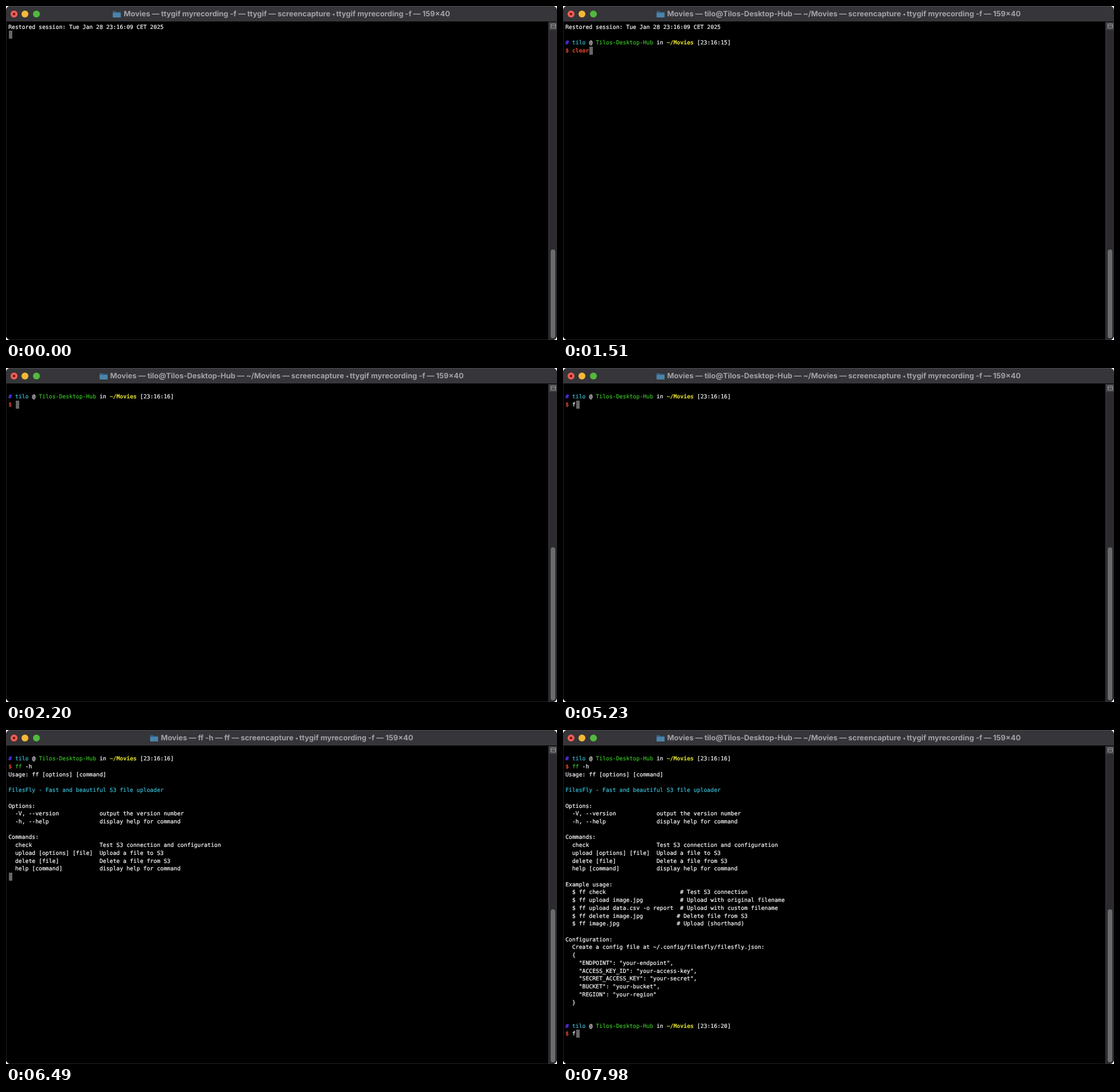
Recreate the animation shown at these times as an HTML page. Size 960 by 583 pixels, loop 8 s.

```html
<!DOCTYPE html>
<html lang="en">
<head>
<meta charset="utf-8">
<title>Terminal session</title>
<style>
  html, body { margin: 0; width: 960px; height: 583px; overflow: hidden; background: #fff; }
  #window {
    position: relative; width: 960px; height: 583px; overflow: hidden;
    border-radius: 8px; background: #000; text-rendering: geometricPrecision;
  }
  #window > *, #track > * { position: absolute; }
  #bar {
    inset: 0 0 auto; height: 27px; background: #363539; box-sizing: border-box;
    border-top: 1px solid #4c4b4f; display: flex; align-items: center; justify-content: center;
    gap: 5px; font: bold 12.9px Inter, "DejaVu Sans", sans-serif; color: #a3a2a6; white-space: pre;
  }
  #bar small { font-size: 8px; vertical-align: 1px; line-height: 0; }
  .light { top: 7.5px; width: 12px; height: 12px; border-radius: 50%; }
  #frame { inset: 27px 0 0; border-left: 1px solid #222; border-bottom: 1px solid #222; }
  #track { left: 945px; top: 28px; width: 15px; bottom: 0; background: #2d2b30; box-shadow: inset 1px 0 #3c3a3f; }
  #split { left: 1px; top: 0; width: 14px; height: 14px; background: #414044; }
  #thumb { left: 4px; width: 8px; bottom: 3px; border-radius: 4px; background: #6b6a6d; }
  #screen {
    left: 4.2px; top: 30.5px; margin: 0; color: #fff; -webkit-text-stroke: .2px;
    font: 9.783px/13.72px "DejaVu Sans Mono", monospace;
  }
  #cursor { width: 6px; height: 14px; background: #666; }
  .hash { color: #5a35ff; font-weight: bold; }
  .cyan { color: #38bfd9; }
  .green { color: #3abf26; }
  .path { color: #d3d02b; font-weight: bold; }
  .red { color: #d0432a; font-weight: bold; }
  .dim { color: #4d4d4d; }
</style>
</head>
<body>
<div id="window">
  <div id="frame"></div>
  <div id="bar">
    <svg width="14" height="13">
      <path d="M0 2Q0 1 1 1H5L6.5 2.5H13Q14 2.5 14 3.5V11Q14 12 13 12H1Q0 12 0 11Z" fill="#336386"/>
      <rect y="4" width="14" height="8" rx="1" fill="#4b82a8"/>
    </svg>
    <span id="title"></span>
  </div>
  <div class="light" style="left:7.5px;background:radial-gradient(#7c1712 2px,#ee5f55 2.6px)"></div>
  <div class="light" style="left:27.3px;background:#f4b837"></div>
  <div class="light" style="left:47px;background:#52b940"></div>
  <div id="track">
    <svg id="split" viewBox="0 0 14 14">
      <path d="M3.5 3.5H11.5V10.5H3.5ZM3.5 6.5H11.5" fill="none" stroke="#a5a4a8"/>
    </svg>
    <div id="thumb"></div>
  </div>
  <div id="cursor"></div>
  <pre id="screen"></pre>
</div>
<script>
const LOOP = 8000, COL = 5.89, ROW = 13.72;
const el = id => document.getElementById(id);
const paint = (style, text) => `<span class="${style}">${text}</span>`;

const user = "tilo", host = "Tilos-Desktop-Hub";
const recorder = "screencapture <small>◂</small> ttygif myrecording -f — 159×40";
const titleOf = job => `Movies — ${job} — ${recorder}`;
const idle = titleOf(`${user}@${host} — ~/Movies`);
const helpTitle = titleOf("ff -h — ff");

const restored = "Restored session: Tue Jan 28 23:16:09 CET 2025";
const prompt = (time, input = "") => [
  `${paint("hash", "#")} ${paint("cyan", user)} @ ${paint("green", host)} in ${paint("path", "~/Movies")} [23:16:${time}]`,
  `${paint("red", "$")} ${input}`
];
const entry = (width, left, right) => "  " + left.padEnd(width - 2) + right;

const usage = [
  "Usage: ff [options] [command]",
  "",
  paint("cyan", "FilesFly - Fast and beautiful S3 file uploader"),
  "",
  "Options:",
  entry(27, "-V, --version", "output the version number"),
  entry(27, "-h, --help", "display help for command"),
  "",
  "Commands:",
  entry(27, "check", "Test S3 connection and configuration"),
  entry(27, "upload [options] [file]", "Upload a file to S3"),
  entry(27, "delete [file]", "Delete a file from S3"),
  entry(27, "help [command]", "display help for command")
];
const examples = [
  "",
  "Example usage:",
  entry(34, "$ ff check", "# Test S3 connection"),
  entry(34, "$ ff upload image.jpg", "# Upload with original filename"),
  entry(34, "$ ff upload data.csv -o report", "# Upload with custom filename"),
  entry(33, "$ ff delete image.jpg", "# Delete file from S3"),
  entry(33, "$ ff image.jpg", "# Upload (shorthand)"),
  "",
  "Configuration:",
  "  Create a config file at ~/.config/filesfly/filesfly.json:",
  "  {",
  '    "ENDPOINT": "your-endpoint",',
  '    "ACCESS_KEY_ID": "your-access-key",',
  '    "SECRET_ACCESS_KEY": "your-secret",',
  '    "BUCKET": "your-bucket",',
  '    "REGION": "your-region"',
  "  }",
  ""
];

// Each step: start time, lines, cursor row, cursor column, title
const steps = [];
const step = (time, lines, row, col, title = idle) => steps.push({ time, lines, row, col, title });

const first = input => [restored, "", ...prompt(15, input)];
const second = input => ["", ...prompt(16, input)];
const ff = paint("green", "ff");
const hint = paint("dim", " upload report.csv -o report");
const called = second(ff + " -h");
const finished = [...called, ...usage, ...examples];

step(0, [restored], 1, 0, titleOf("ttygif myrecording -f — ttygif"));
step(450, [restored], 1, 0);
step(550, first(), 3, 2);
step(1130, first("c"), 3, 3);
for (let n = 1; n <= 5; n++) {
  step(1160 + 70 * n, first(paint("red", "clear".slice(0, n))), 3, 2 + n);
}
step(1610, first(paint("green", "clear")), 3, 7);
step(1800, first(paint("green", "clear")), 4, 0);
step(1900, [], 0, 0, titleOf("clear — clear"));
step(2000, [], 0, 0);
step(2100, second(), 2, 2);
step(5230, second("f"), 2, 3);
step(5330, second(paint("red", "f")), 2, 3);
step(5480, second(paint("red", "f") + "f"), 2, 4);
step(5580, second(ff + hint), 2, 4);
step(5690, second(ff + hint), 2, 5);
step(5870, second(ff + " -"), 2, 6);
step(6080, second(ff + " -h"), 2, 7);
step(6340, called, 3, 0);
step(6440, called, 3, 0, helpTitle);
step(6490, [...called, ...usage], 16, 0, helpTitle);
step(6590, finished, 34, 0, helpTitle);
step(6690, [...finished, "", ...prompt(20)], 36, 2);
step(7980, [...finished, "", ...prompt(20, "f")], 36, 3);

let shown;
function draw(now) {
  const time = now % LOOP;
  const current = steps.findLast(s => s.time <= time);
  if (current !== shown) {
    shown = current;
    el("title").innerHTML = current.title;
    el("screen").innerHTML = current.lines.join("\n");
    el("cursor").style.left = Math.round(5 + current.col * COL) + "px";
    el("cursor").style.top = Math.round(29.4 + current.row * ROW) + "px";
    el("thumb").style.top = (current.time < 1900 ? 397 : 285) + "px";
  }
  requestAnimationFrame(draw);
}
draw(performance.now());
</script>
</body>
</html>
```
